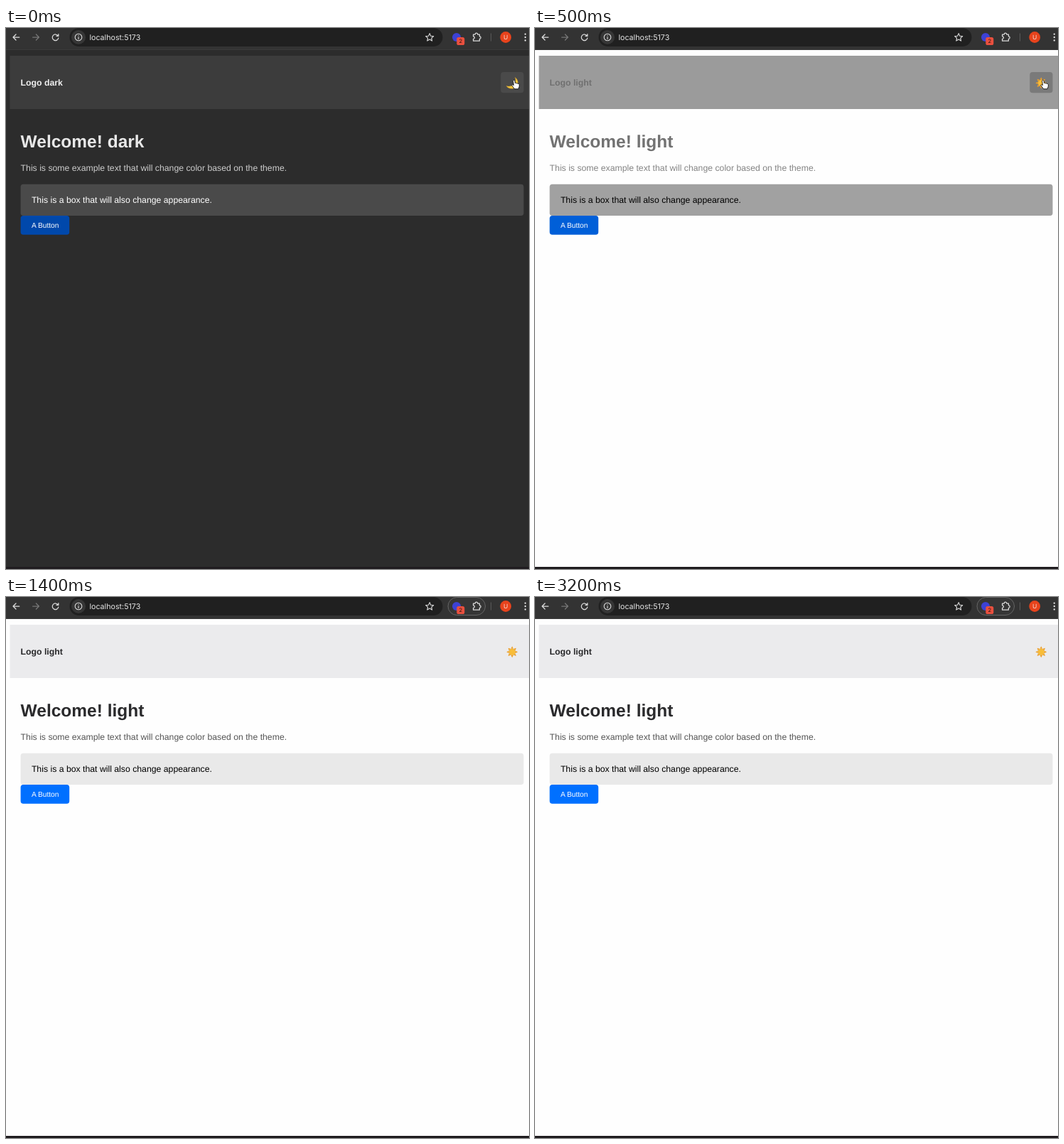
An HTML page for the animation above (3300 ms loop, 736x761 px).

```html
<!DOCTYPE html>
<html lang="en">
<head>
<meta charset="utf-8">
<title>Theme switch</title>
<style>
  html, body { margin: 0; width: 100%; height: 100%; overflow: hidden; background: #2c2c2c; }
  svg { display: block; width: 736px; height: 761px; }
  text { font-family: "Liberation Sans", Arial, sans-serif; font-size: 12.25px; text-rendering: geometricPrecision; }
  .bold { font-weight: 700; }
  .ui { font-family: Inter, Roboto, sans-serif; }
  .line { fill: none; stroke: #dcdcdc; stroke-width: 1.25; stroke-linecap: round; stroke-linejoin: round; }
  #page { fill: var(--page); }
  #header { fill: var(--header); }
  #toggle { fill: var(--toggle); }
  #logo { fill: var(--logo); }
  #title { fill: var(--title); font-size: 24.5px; }
  #copy { fill: var(--copy); }
  #box { fill: var(--box); }
  #boxText { fill: var(--boxText); }
  #button { fill: var(--button); }
</style>
</head>
<body>
<svg viewBox="0 0 736 761">
  <rect id="page" width="736" height="761"/>
  <rect id="bottom" y="758" width="736" height="3" fill="#1f1c1f"/>

  <!-- page -->
  <rect id="header" x="5.5" y="39" width="731" height="75"/>
  <text id="logo" class="bold" x="20.6" y="80.8"></text>
  <rect id="toggle" x="696.3" y="62" width="32.2" height="29.3" rx="3.8"/>
  <path id="moon" fill="#f5c63c" stroke="#c9952a" stroke-width=".4"
    d="M716.4 69.4C721.4 73 721.8 80 717 83.4C712.6 86.6 706.6 85.4 704.2 81.4C708.4 82.8 712.8 81.8 715.2 78.6C717.4 75.8 717.8 72.4 716.4 69.4Z"/>
  <g id="sun">
    <g id="rays" fill="#eca02c"></g>
    <circle cx="712.3" cy="77.3" r="4.5" fill="#f8bd38" stroke="#e59a2a" stroke-width=".5"/>
  </g>
  <text id="title" class="bold" x="20.6" y="168.3"></text>
  <text id="copy" x="20.6" y="201.4">This is some example text that will change color based on the theme.</text>
  <rect id="box" x="20.6" y="219.8" width="707.9" height="44.2" rx="3.8"/>
  <text id="boxText" x="35.9" y="245.6">This is a box that will also change appearance.</text>
  <rect id="button" x="20.6" y="264" width="68.6" height="26.7" rx="3.8"/>
  <text x="35.9" y="280.9" style="font-size:10.2px" fill="#fff">A Button</text>

  <!-- browser bar -->
  <rect width="736" height="31" fill="#333"/>
  <rect y="30" width="736" height="1" fill="#3a3a3a"/>
  <rect x="89.5" y="0" width="525" height="26" rx="13" fill="#202020"/>
  <path class="line" d="M18.8 13H10.2M14 9L10 13L14 17"/>
  <path class="line" style="stroke:#777" d="M37.6 13H46.2M42.4 9L46.4 13L42.4 17"/>
  <path class="line" d="M73.2 11A4.3 4.3 0 1 0 73.8 14M73.8 8.6V11.4H71"/>
  <circle cx="102" cy="13" r="10" fill="#363636"/>
  <circle class="line" style="stroke-width:1.1" cx="102" cy="13" r="4.8"/>
  <path class="line" style="stroke-width:1.1" d="M102 12.8V15.4M102 10.6V10.7"/>
  <text class="ui" x="117.4" y="16.9" style="font-size:10.7px" fill="#e6e6e6">localhost:5173</text>
  <polygon id="star" class="line" style="stroke-width:1.1"/>
  <rect id="pill" x="622" y=".5" width="52.5" height="25" rx="12.5" fill="#363636" stroke="#666"/>
  <circle cx="634" cy="13" r="6" fill="#3d42d6"/>
  <rect x="634.3" y="13" width="11" height="11" rx="2.6" fill="#e9503f"/>
  <text class="ui" x="639.8" y="21.3" text-anchor="middle" style="font-size:7.6px" fill="#26130f">2</text>
  <path class="line" d="M657.6 9H660.2A1.8 1.8 0 0 1 663.8 9H666.4V11.8A1.8 1.8 0 0 1 666.4 15.4V18.2H657.6V15.4A1.8 1.8 0 0 0 657.6 11.8Z"/>
  <path d="M682.5 7.5V18.5" stroke="#595959"/>
  <circle cx="703.2" cy="13" r="7.9" fill="#e8431c"/>
  <text class="ui" x="703.2" y="16.1" text-anchor="middle" style="font-size:8.5px" fill="#f6ddd5">U</text>
  <g fill="#dcdcdc">
    <circle cx="730.8" cy="8.6" r="1.2"/><circle cx="730.8" cy="13" r="1.2"/><circle cx="730.8" cy="17.4" r="1.2"/>
  </g>

  <!-- pointer, tip at 0,0 -->
  <g id="pointer" stroke-linejoin="round" stroke-width=".9">
    <path id="hand" fill="#fff" stroke="#111"
      d="M-1 1C-1 -.4 1.2 -.4 1.4 1L2 4.2C2.6 3.4 4 3.7 4.1 4.7C4.8 4 6 4.4 6.1 5.3C6.9 4.8 7.8 5.3 7.8 6.2L7.6 9.2L6.4 12.4H1.2L-2.6 7.6C-3.2 6.5 -1.8 5.8 -.9 6.6L-.1 7.3Z"/>
    <path id="arrow" fill="#111" stroke="#fff" d="M0 0V11.4L2.6 9L4.4 13L6.3 12.2L4.6 8.3H8Z"/>
  </g>
</svg>
<script>
const $ = id => document.getElementById(id);
const STEP = 100, LOOP = 3300, SWITCH = 4, LEAVE = 10, HOVER = 13;

// Each row: dark, then the three steps of the fade, then light.
const colors = {
  page:    ["#2c2c2c", "#fefefe", "#fefefe", "#fefefe", "#fefefe"],
  header:  ["#3c3c3c", "#404040", "#9b9b9b", "#dedede", "#ebebeb"],
  toggle:  ["#4a4a4a", "#464646", "#7a7a7a", "#d6d6d6", "#ebebeb"],
  logo:    ["#f0f0f0", "#ececec", "#707070", "#353535", "#28282a"],
  title:   ["#e8e8e8", "#e2e2e2", "#727272", "#363636", "#2a2a2c"],
  copy:    ["#cccccc", "#c0c0c0", "#848484", "#5c5c5c", "#555555"],
  box:     ["#4a4a4a", "#4f4f4f", "#a1a1a1", "#dddddd", "#e9e9e9"],
  boxText: ["#ffffff", "#000000", "#000000", "#000000", "#000000"],
  button:  ["#0048ab", "#004aae", "#005fd8", "#006cf6", "#0070ff"]
};

// Pointer tip by step once it starts to leave.
const exit = [[709, 55], [695, 30], [681, 8]];

const ring = (n, f) => Array.from({ length: n }, (_, i) => f(i));
const polar = (cx, cy, r, a) =>
  `${(cx + r * Math.cos(a)).toFixed(2)},${(cy + r * Math.sin(a)).toFixed(2)}`;

$("star").setAttribute("points",
  ring(10, i => polar(596.2, 13.4, i % 2 ? 2.7 : 5.8, (i * 36 - 90) * Math.PI / 180)).join(" "));
$("rays").innerHTML = ring(8, i => {
  const a = i * Math.PI / 4, p = (r, d) => polar(712.3, 77.3, r, a + d);
  return `<polygon points="${p(5, -.34)} ${p(8, 0)} ${p(5, .34)}"/>`;
}).join("");

const show = (id, on) => $(id).style.display = on ? "" : "none";
let last = -1;

function draw(now) {
  const step = Math.floor(now % LOOP / STEP);
  if (step !== last) {
    last = step;
    const light = step >= SWITCH;
    const phase = Math.max(0, Math.min(4, step - SWITCH + 1));
    for (const name in colors)
      document.documentElement.style.setProperty("--" + name, colors[name][phase]);
    if (step >= LEAVE)
      for (const name of ["header", "toggle"])
        document.documentElement.style.setProperty("--" + name, "#ebebed");

    const theme = light ? "light" : "dark";
    $("logo").textContent = "Logo " + theme;
    $("title").textContent = "Welcome! " + theme;
    show("moon", !light);
    show("sun", light);

    const leaving = step >= LEAVE;
    const [x, y] = leaving ? exit[Math.min(step - LEAVE, exit.length - 1)] : [714.6, 73.4];
    $("pointer").setAttribute("transform", `translate(${x} ${y})`);
    show("pointer", step < HOVER);
    show("hand", !leaving);
    show("arrow", leaving);
    show("pill", step >= HOVER);
  }
  requestAnimationFrame(tick);
}

const start = performance.now();
function tick() { draw(performance.now() - start); }
tick();
</script>
</body>
</html>
```
